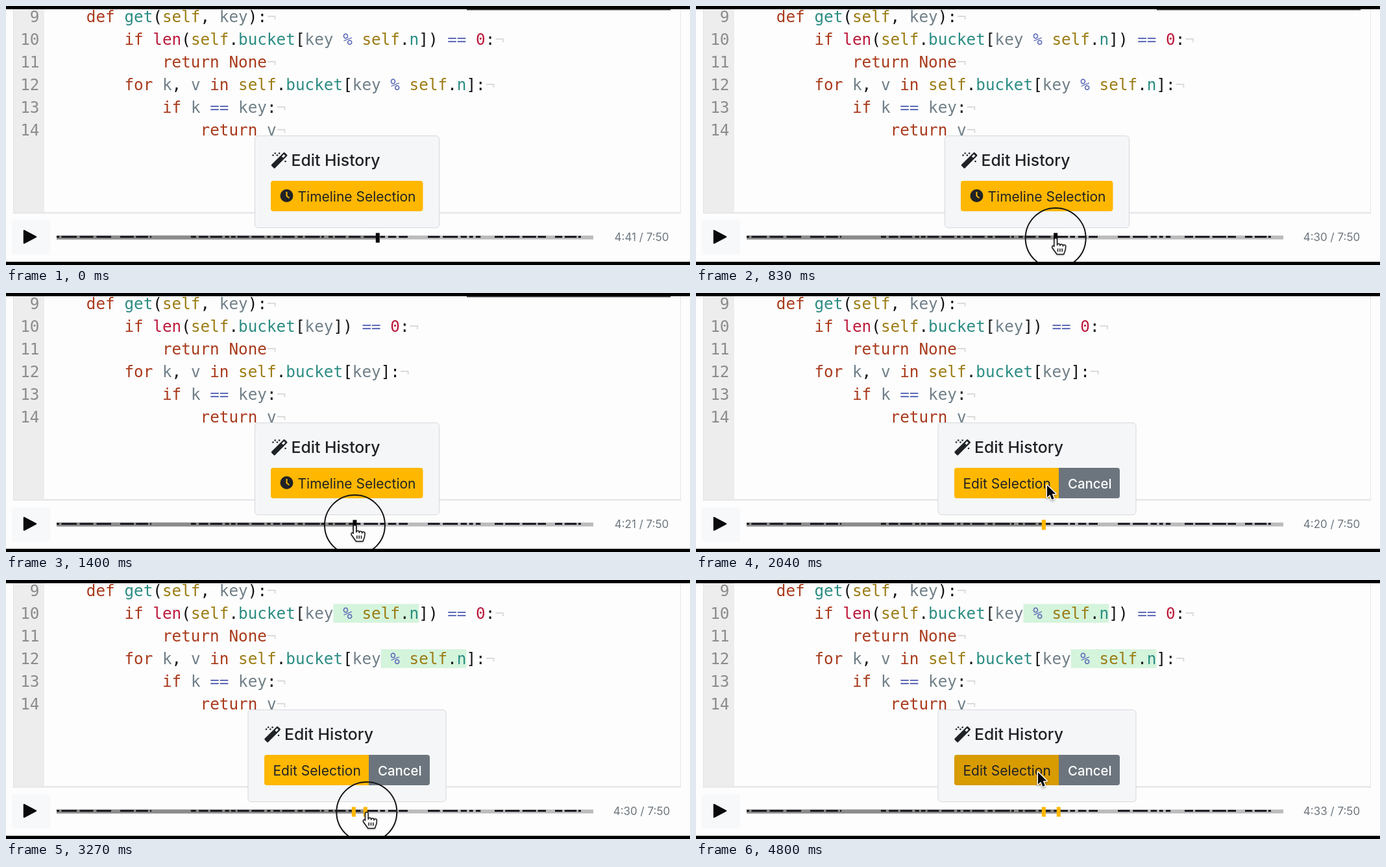
An HTML page with a canvas that plays this animation: 1054 px wide and 400 px high, repeating every 4.83 s.

```html
<!DOCTYPE html>
<html lang="en">
<head>
<meta charset="utf-8">
<title>Edit history</title>
<style>
html, body { margin: 0; width: 100%; height: 100%; overflow: hidden; background: #fdfdfd; }
canvas { display: block; width: 1054px; height: 400px; }
</style>
</head>
<body>
<canvas id="stage"></canvas>
<script>
const W = 1054, H = 400, LOOP = 4830;
const canvas = document.getElementById('stage');
const ctx = canvas.getContext('2d');
const dpr = window.devicePixelRatio || 1;
canvas.width = W * dpr;
canvas.height = H * dpr;

const MONO = '24.3px "DejaVu Sans Mono", monospace';
const SANS = 'Inter, "Open Sans", sans-serif';
const CELL = 14.64, CODE_X = 65.3, LINE_H = 35;
const TRACK = { x: 78, y: 354.5, w: 827, total: 470 };
const INSERT = ' % self.n';
const AMBER = '#ffb700', INK = '#1f2226', PAPER = '#fdfdfd';
const SELECT_AT = 1960, MARK = 260.2;

const LINES = [
  '    def get(self, key):',
  '        if len(self.bucket[key@]) == 0:',
  '            return None',
  '        for k, v in self.bucket[key@]:',
  '            if k == key:',
  '                return v'
];

const COLORS = {};
const paint = (words, color) => words.split(' ').forEach(w => COLORS[w] = color);
paint('def if return for in None', '#a93a1c');
paint('len 0', '#bd1a3c');
paint('get bucket n', '#2b8c83');
paint('self', '#9c7c14');
paint('== %', '#5f6cb8');
paint('( ) [ ] : , .', '#121216');
paint('¬', '#dcdcdc');
const VARIABLE = '#707f88';

const BURSTS = [[78, 165], [176, 224], [285, 490], [497, 619], [650, 733], [753, 832], [846, 886]];

const clamp = (v, lo, hi) => Math.min(hi, Math.max(lo, v));
const mix = (a, b, u) => a + (b - a) * u;
const span = (t, a, b) => clamp((t - a) / (b - a), 0, 1);
const easeOut = u => 1 - Math.pow(1 - u, 1.6);
const smooth = (t, a, b) => { const u = span(t, a, b); return u * u * (3 - 2 * u); };
const timeX = s => TRACK.x + s / TRACK.total * TRACK.w;

function seeded(seed) {
  return () => (seed = (seed * 16807) % 2147483647) / 2147483647;
}

// Scrub back to the mark, then forward to the end of the selection
const playhead = t =>
  281.2 - 21 * easeOut(span(t, 430, 1560)) + 13 * easeOut(span(t, 2660, 3650));

const isPressed = t => (t >= 430 && t < 1615) || (t >= 2500 && t < 3730);

function pointerAt(t) {
  const away = 1 - smooth(t, 90, 400);
  const onButton = smooth(t, 1640, 1850) - smooth(t, 2160, 2450) + smooth(t, 4280, 4620);
  const grip = timeX(playhead(t)) + (t < SELECT_AT ? 0 : 2);
  return {
    x: mix(grip, t < 3000 ? 541 : 527, onButton) + 18 * away,
    y: mix(358.5, 297, onButton) + 54 * away
  };
}

function rect(x, y, w, h, color) {
  ctx.fillStyle = color;
  ctx.fillRect(x, y, w, h);
}

function rounded(x, y, w, h, r, fill, stroke) {
  ctx.beginPath();
  ctx.roundRect(x, y, w, h, r);
  ctx.fillStyle = fill;
  ctx.fill();
  if (stroke) {
    ctx.strokeStyle = stroke;
    ctx.lineWidth = 1;
    ctx.stroke();
  }
}

function disc(x, y, r, color) {
  ctx.beginPath();
  ctx.arc(x, y, r, 0, Math.PI * 2);
  ctx.fillStyle = color;
  ctx.fill();
}

function text(str, x, y, font, color, align = 'left') {
  ctx.font = font;
  ctx.fillStyle = color;
  ctx.textAlign = align;
  ctx.fillText(str, x, y);
}

function drawCode(seconds, selecting) {
  rect(11, 5, 48, 316, '#ededed');
  rect(11, 318, 1029, 3, '#eaeaee');
  rect(11, 5, 1, 316, '#e2e2e6');
  rect(1039, 5, 1, 316, '#e6e6ec');
  if (!selecting) rect(710, 5, 314, 1.5, '#3a3c40');

  LINES.forEach((line, i) => {
    const y = 25 + i * LINE_H;
    const slot = line.indexOf('@');
    const count = Math.floor((seconds - 260 - i * 4 / 3) * 3);
    const typed = slot < 0 ? '' : INSERT.slice(0, clamp(count, 0, INSERT.length));
    if (typed && selecting) {
      rect(CODE_X + slot * CELL, y - 23, typed.length * CELL, 29, '#d4f4dc');
    }
    text(9 + i, 51.5, y, MONO, '#8c8c8c', 'right');
    let col = 0;
    for (const token of (line.replace('@', typed) + '¬').match(/\w+|==|\s+|./g)) {
      text(token, CODE_X + col * CELL, y, MONO, COLORS[token] || VARIABLE);
      col += token.length;
    }
  });
}

function drawWand(x, y) {
  ctx.save();
  ctx.translate(x, y);
  for (let i = 0; i < 4; i++) disc(3 + i * 3.2, i % 2 ? 2.5 : 5.5, 1.3, INK);
  disc(22, 15, 1.3, INK);
  ctx.translate(13, 13);
  ctx.rotate(-Math.PI / 4);
  rounded(-15, -3.8, 29, 7.6, 1.5, INK);
  rect(6.5, -1.6, 4.5, 3.2, '#f4f6f8');
  ctx.restore();
}

function drawClock(x, y) {
  disc(x, y, 10, INK);
  ctx.beginPath();
  ctx.moveTo(x, y - 6);
  ctx.lineTo(x, y + .5);
  ctx.lineTo(x + 4, y + 3.5);
  ctx.strokeStyle = AMBER;
  ctx.lineWidth = 2;
  ctx.stroke();
}

function drawPopup(selecting, hover) {
  const x = selecting ? 373 : 383.5, w = selecting ? 305 : 284;
  const label = '21px ' + SANS;
  const amber = hover ? '#d89b00' : AMBER;
  rounded(x, 200.5, w, 142, 5, '#f4f6f8', '#d6d8dc');
  drawWand(x + 25, 225);
  text('Edit History', x + 56, 247, '500 24.8px ' + SANS, INK);
  if (selecting) {
    rounded(398, 270, 161, 47, [4, 0, 0, 4], amber);
    rounded(559, 270, 94, 47, [0, 4, 4, 0], '#6c757d');
    text('Edit Selection', 411.5, 302, label, INK);
    text('Cancel', 573, 302, '500 20.4px ' + SANS, '#fff');
  } else {
    rounded(408, 270, 234.5, 47, 4, amber);
    drawClock(432.5, 293);
    text('Timeline Selection', 449.5, 302, label, INK);
  }
}

function drawEdits() {
  const random = seeded(41);
  for (const [from, to] of BURSTS) {
    for (let x = from; x < to;) {
      const w = Math.min(4 + random() * 20, to - x);
      rect(x, TRACK.y + .5, w, 3, '#1c1d22');
      x += w + 2.5 + random() * 2.5;
    }
  }
}

function drawPlayer(seconds, selecting) {
  rect(9, 331, 59, 53, '#f7f8fa');
  ctx.beginPath();
  ctx.moveTo(28, 347);
  ctx.lineTo(46, 356.5);
  ctx.lineTo(28, 366);
  ctx.closePath();
  ctx.fillStyle = ctx.strokeStyle = '#0a0a0c';
  ctx.lineJoin = 'round';
  ctx.lineWidth = 2.5;
  ctx.fill();
  ctx.stroke();

  const x = timeX(seconds);
  rect(TRACK.x, TRACK.y, TRACK.w, 6, '#bbbbbd');
  rect(TRACK.x, TRACK.y, x - TRACK.x, 6, '#8b8b8c');
  drawEdits();
  const handle = (hx, color) => rect(hx - 3, 350.5, 6, 15, color);
  if (selecting) handle(timeX(MARK), AMBER);
  handle(x, selecting ? AMBER : '#08080a');

  const clock = Math.floor(seconds / 60) + ':' + String(Math.floor(seconds % 60)).padStart(2, '0');
  text(clock + ' / 7:50', 979.5, 362.5, '17px ' + SANS, '#6c757d', 'center');
}

function handPath() {
  const path = new Path2D();
  path.moveTo(-2.3, 13);
  path.lineTo(-2.3, 2.3);
  path.arc(0, 2.3, 2.3, Math.PI, 0);
  for (let i = 0; i < 3; i++) {
    path.arc(4.6 + i * 4.4, 11 + i * .8, 2.2, Math.PI, 0);
  }
  path.lineTo(15, 18);
  path.lineTo(12.5, 25);
  path.lineTo(2, 25);
  path.lineTo(-5.5, 14.5);
  path.quadraticCurveTo(-5.5, 10, -2.3, 13);
  path.closePath();
  for (let i = 0; i < 3; i++) {
    path.moveTo(3.4 + i * 3.3, 16);
    path.lineTo(3.4 + i * 3.3, 21);
  }
  return path;
}

const HAND = handPath();
const ARROW = new Path2D('M0 0V18.5L4.3 14.5L7.3 22L10.7 20.5L7.7 13.3H13.4Z');

function drawPointer(t, x, y) {
  if (t < 90) return;
  if (isPressed(t)) {
    ctx.beginPath();
    ctx.arc(x, y, 46.5, 0, Math.PI * 2);
    ctx.strokeStyle = '#141416';
    ctx.lineWidth = 2;
    ctx.stroke();
  }
  ctx.save();
  ctx.translate(x, y);
  ctx.lineJoin = 'round';
  ctx.shadowColor = 'rgba(0,0,0,.35)';
  ctx.shadowBlur = 3 * dpr;
  ctx.shadowOffsetY = 1.5 * dpr;
  if (y > 343) {
    ctx.fillStyle = '#fff';
    ctx.fill(HAND);
    ctx.shadowColor = 'transparent';
    ctx.strokeStyle = '#141416';
    ctx.lineWidth = 1.5;
    ctx.stroke(HAND);
  } else {
    ctx.strokeStyle = '#fff';
    ctx.lineWidth = 3;
    ctx.stroke(ARROW);
    ctx.shadowColor = 'transparent';
    ctx.fillStyle = '#08080a';
    ctx.fill(ARROW);
  }
  ctx.restore();
}

function draw(t) {
  const seconds = playhead(t);
  const { x, y } = pointerAt(t);
  const selecting = t >= SELECT_AT;
  // A fresh button only reacts once the pointer moves again
  const settled = !selecting || t > 2160;
  const hover = settled && x > 398 && x < (selecting ? 559 : 642) && y > 270 && y < 317;

  ctx.setTransform(dpr, 0, 0, dpr, 0, 0);
  rect(0, 0, W, H, PAPER);
  drawCode(seconds, selecting);
  drawPlayer(seconds, selecting);
  drawPopup(selecting, hover);
  drawPointer(t, x, y);
  rect(0, 0, W, 5, '#000');
  rect(0, 395, W, 5, '#000');
}

const start = performance.now();
function tick() {
  draw((performance.now() - start) % LOOP);
  requestAnimationFrame(tick);
}
tick();
</script>
</body>
</html>
```
